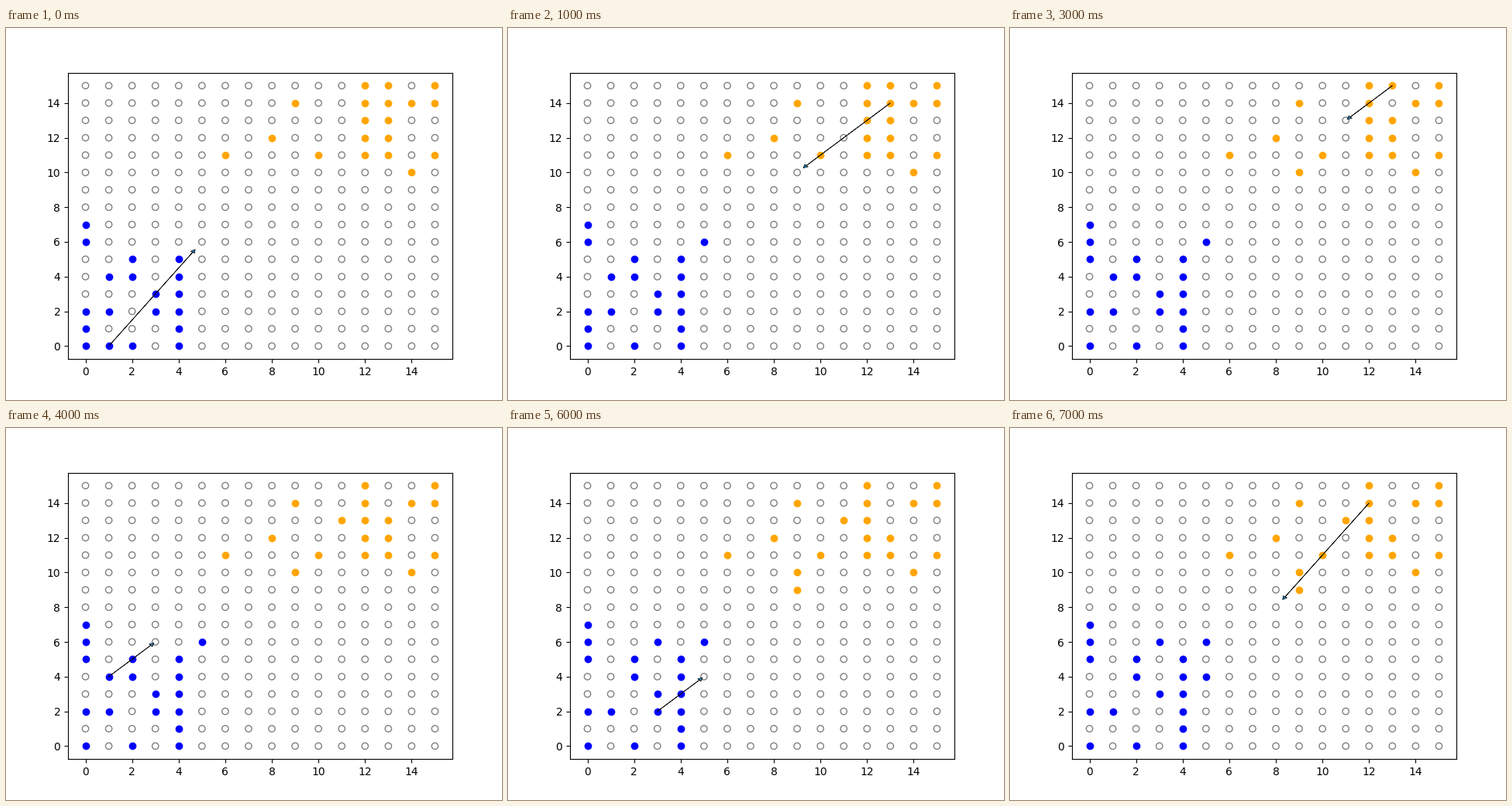
Animation of 640 by 480 pixels, one loop 8000 ms. Source, as a matplotlib script:

```python
from itertools import product

import matplotlib.pyplot as plt
from matplotlib.animation import FuncAnimation

SIZE = 16
BOARD = set(product(range(SIZE), repeat=2))
STEPS = [s for s in product((-1, 0, 1), repeat=2) if s != (0, 0)]
COLORS = ("blue", "orange")

# Occupied rows by column
BLUE = {0: (0, 1, 2, 6, 7), 1: (0, 2, 4), 2: (0, 4, 5), 3: (2, 3), 4: range(6)}
ORANGE = {6: [11], 8: [12], 9: [14], 10: [11], 12: range(11, 16),
          13: range(11, 16), 14: (10, 14), 15: (11, 14, 15)}

# The piece played each turn; blue and orange alternate
PLAYED = [(1, 0), (13, 14), (0, 1), (13, 15),
          (1, 4), (13, 13), (3, 2), (12, 14)]


def cells(columns):
    return {(x, y) for x, rows in columns.items() for y in rows}


def landings(start, others):
    """All free cells reached by chains of jumps over other pieces."""
    found, todo = set(), [start]
    while todo:
        x, y = todo.pop()
        for dx, dy in STEPS:
            over, land = (x + dx, y + dy), (x + 2 * dx, y + 2 * dy)
            if over in others and land in BOARD - others - found:
                found.add(land)
                todo.append(land)
    return found


def play():
    """Each turn's pieces and move: the jump chain that gets furthest ahead."""
    sides = [cells(BLUE), cells(ORANGE)]
    turns = []
    for i, start in enumerate(PLAYED):
        forward = 1 if i % 2 == 0 else -1
        others = sides[0] | sides[1] - {start}
        others.discard(start)
        end = max(landings(start, others),
                  key=lambda c: (forward * sum(c), c[1]))
        turns.append(([set(s) for s in sides], start, end))
        sides[i % 2].remove(start)
        sides[i % 2].add(end)
    return turns


TURNS = play()
fig, ax = plt.subplots(figsize=(6.4, 4.8), dpi=100)


def draw(turn):
    sides, (x, y), (x2, y2) = TURNS[turn]
    ax.clear()
    empty = BOARD - sides[0] - sides[1]
    ax.scatter(*zip(*empty), facecolors="none", edgecolors="gray")
    for pieces, color in zip(sides, COLORS):
        ax.scatter(*zip(*pieces), color=color)
    ax.arrow(x, y, 0.9 * (x2 - x), 0.9 * (y2 - y), lw=0.5,
             head_width=0.2, head_length=0.2, ec="black")


anim = FuncAnimation(fig, draw, frames=len(TURNS), interval=1000,
                     init_func=lambda: None, repeat=True, repeat_delay=0)
plt.show()
```
